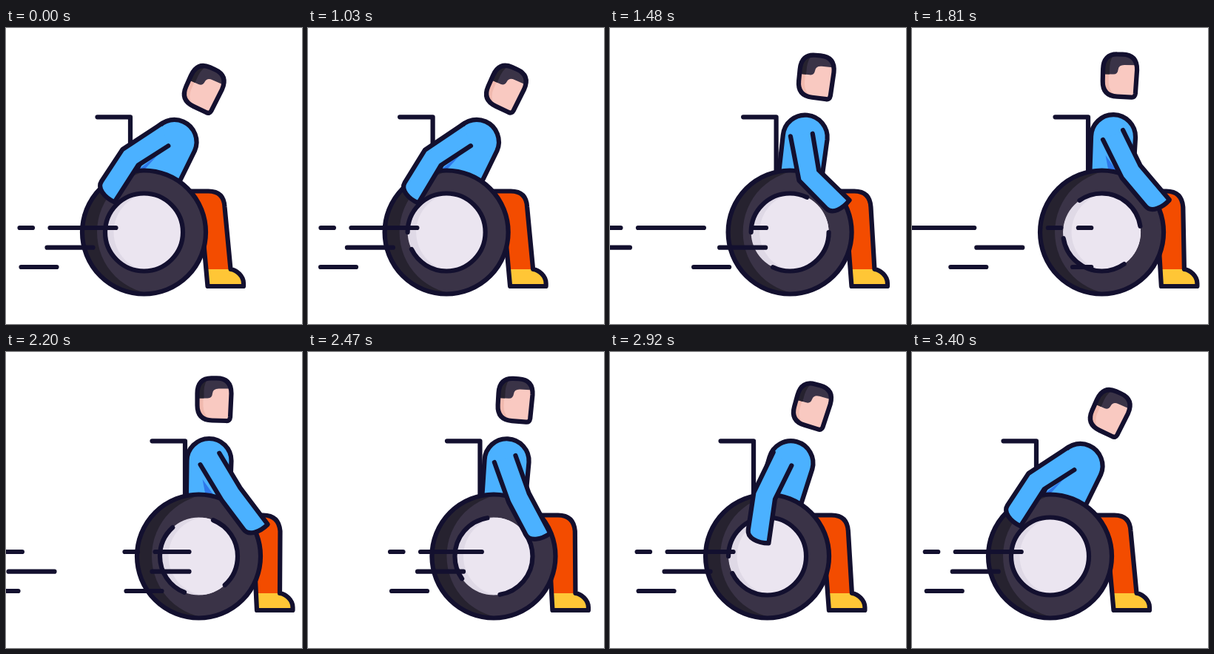
These frames come from a looping animation (400x400 px, 3.43 s). An HTML page:

```html
<!DOCTYPE html>
<html lang="en">
<head>
<meta charset="utf-8">
<title>Wheelchair</title>
<style>
  html, body { margin: 0; width: 100%; height: 100%; overflow: hidden; background: #fff; }
  svg { display: block; width: 100vw; height: 100vh; }
  .line { fill: none; stroke: #13102f; stroke-width: 6.2; stroke-linecap: round; stroke-linejoin: round; }
  .blue { fill: #4bb1ff; }
  .shade { fill: #2f78ea; }
  .dark { fill: #3a3347; }
  .darker { fill: #26222f; }
</style>
</head>
<body>
<svg viewBox="0 0 400 400">
  <defs>
    <path id="headShape" d="M185 72V56Q185 35.300 204 35.300H211Q231 35.300 231 56L229.500 88Q229 93.500 224 93L205 92.500Q185 92 185 72Z"/>
    <clipPath id="headClip"><use href="#headShape"/></clipPath>
    <clipPath id="tireClip"><circle cx="187" cy="276" r="83.500"/></clipPath>
    <clipPath id="discClip"><circle cx="187" cy="276" r="52.500"/></clipPath>
  </defs>
  <g id="chair">
    <path class="line" d="M124 120.300H168.500V200"/>
    <path id="trousers" fill="#f34c00"/>
    <path id="shoe" fill="#ffc636"/>
    <path id="legLine" class="line"/>
    <g id="body">
      <path class="line" style="fill:#4bb1ff" d="M170 225L171 147A30 30 0 0 1 231 147L228 225Z"/>
      <g clip-path="url(#headClip)">
        <rect x="180" y="30" width="56" height="66" fill="#f9c9c1"/>
        <path fill="#f1b9ae" d="M180 60H193V74Q194 87 206 94H180Z"/>
        <path class="dark" d="M180 30H236V49.500H214Q206 49.500 205.500 56Q205 62.500 199 62.500H180Z"/>
        <path class="darker" d="M180 30H206Q195 36 194 52V62.500H180Z"/>
      </g>
      <use href="#headShape" class="line"/>
    </g>
    <path id="shadowBack" class="shade" d="M180 191L206 171L187 192Z"/>
    <path id="shadowFront" class="shade" d="M192 172L207 193H196Z"/>
    <g clip-path="url(#tireClip)">
      <circle class="darker" cx="187" cy="276" r="84"/>
      <circle class="dark" cx="207.500" cy="276" r="84"/>
    </g>
    <circle class="line" cx="187" cy="276" r="83.500"/>
    <g clip-path="url(#discClip)">
      <circle cx="187" cy="276" r="53" fill="#dfd9e6"/>
      <circle cx="199" cy="276" r="53" fill="#ebe5f0"/>
    </g>
    <path id="rim" class="line" pathLength="360" d="M134.500 276A52.500 52.500 0 0 1 239.500 276A52.500 52.500 0 0 1 134.500 276"/>
    <path id="armFill" class="blue"/>
    <path id="armLine" class="line"/>
    <path id="speed" class="line"/>
  </g>
</svg>
<script>
const LOOP = 3430, START = 1030, STEP = 30;
const TURN = 2200, TRIP = 1200, TRAVEL = 74, LEAN = 24;
const $ = id => document.getElementById(id);
const set = (id, name, value) => $(id).setAttribute(name, value);
const clamp = (x, max = 1) => Math.max(0, Math.min(max, x));
const smooth = u => u * u * (3 - 2 * u);

// Same as cubic-bezier(.167, 0, .1, 1)
function push(x) {
  let lo = 0, hi = 1;
  for (let i = 0; i < 24; i++) {
    const s = (lo + hi) / 2, r = 1 - s;
    if (.5 * s * r * r + .3 * s * s * r + s * s * s < x) lo = s; else hi = s;
  }
  return smooth(lo);
}

// Point reached from o by going along the angle (0 = down), then across to the rear
function reach(o, deg, along, across = 0) {
  const a = deg * Math.PI / 180, s = Math.sin(a), c = Math.cos(a);
  return [o[0] + s * along - c * across, o[1] + c * along + s * across];
}

// Two jointed sections of even width; the forearm swings out while pushing
function drawArm(p, forward) {
  const upper = -57 + 88 * p;
  const fore = -33 + 70 * p + (forward ? 136 * p * (1 - p) : 0);
  const half = 15, skew = 4 * (1 - p);
  const shoulder = [202 + 13 * (1 - p) ** 2, 144.5];
  const elbow = reach(shoulder, upper, 55.5);
  const wrist = reach(elbow, fore, 55.5);
  const bend = (upper + fore) / 2;
  const d = 'M' + reach(shoulder, upper, -skew, half) +
    'L' + reach(elbow, bend, 0, half) +
    'L' + reach(wrist, fore, -7, half) +
    'C' + reach(wrist, fore, 4, half) + ' ' + reach(wrist, fore, 9, 0) + ' ' + reach(wrist, fore, 7, -half) +
    'L' + reach(elbow, bend, 0, -half) +
    'L' + reach(shoulder, upper, skew, -half);
  set('armFill', 'd', d + 'Z');
  set('armLine', 'd', d);
}

// The foot lags behind as the knee opens
function drawLeg(q) {
  const f = -7.5 * q;
  const foot = `C${312 + f} 327 ${321.5 + f} 335 ${321.5 + f} 345V349H${273 + f}`;
  const leg = `M250 220.500H274Q295 220.500 ${296 + q} 242L${304 + f} 326`;
  const heel = `L${264 + f * .45} 250`;
  set('trousers', 'd', `${leg}H${271 + f}${heel}Z`);
  set('shoe', 'd', `M${271 + f} 326H${304 + f}${foot}Z`);
  set('legLine', 'd', leg + foot + heel);
}

// Resting dashes are [left, length]; "out" and "lead" are speeds in px per ms
const rows = [
  { y: 270, dashes: [[19, 17.5], [60, 89]], out: .17, lead: .07 },
  { y: 296.7, dashes: [[56, 62]], out: .32, lead: .15, extra: true },
  { y: 323, dashes: [[21, 48]], out: .41, lead: .15, extra: true }
];

// One wave leaves, an extra one may pass, the last one settles
function drawStreaks(t, p) {
  const edge = 150 + 24 * p;
  const late = t - TURN;
  const settle = late < 0 ? 0 : Math.max(0, 68 - .145 * late) - 8 * Math.sin(Math.PI * clamp((t - 2440) / 990));
  let d = '';
  for (const { y, dashes, out, lead, extra } of rows) {
    const shifts = [-out * Math.max(0, t - 1020), late < 0 ? 68 - lead * late : settle];
    if (extra) shifts.push(36 - .225 * (t - 1480));
    for (const [left, len] of dashes) for (const shift of shifts) {
      const x = left + shift, end = Math.min(x + len, edge);
      if (end > x) d += `M${x} ${y}H${end}`;
    }
  }
  set('speed', 'd', d);
}

// The rim opens into two arcs, turns half a round and closes
function drawRim(t) {
  const gap = 64;
  const open = clamp((t - 1030) / 450), close = clamp((t - 2680) / 240, 1.2);
  const dash = 116 + 218 * (1 - open + close);
  const spin = 1 - (1 - clamp((t - 1480) / 1440)) ** 1.4;
  set('rim', 'stroke-dasharray', t >= START && dash < 360 ? `${dash} ${gap}` : 'none');
  set('rim', 'stroke-dashoffset', -spin * (dash + gap));
}

function draw(time) {
  const t = time < START ? 0 : START + STEP * Math.floor((time - START) / STEP);
  const forward = t < TURN;
  const out = clamp((t - TURN + TRIP) / TRIP);
  const back = 1 - smooth(clamp((t - TURN) / TRIP));
  const p = forward ? push(out) : back;
  set('chair', 'transform', `translate(${TRAVEL * p - .5})`);
  set('body', 'transform', `rotate(${LEAN * (1 - p)} 198 214)`);
  set('shadowBack', 'opacity', p < .2 ? 1 : 0);
  set('shadowFront', 'opacity', p > .92 ? 1 : 0);
  drawArm(p, forward);
  drawLeg(forward ? smooth(out) : back);
  drawRim(t);
  drawStreaks(t, p);
}

const origin = performance.now();
function tick() {
  draw((performance.now() - origin) % LOOP);
  requestAnimationFrame(tick);
}
tick();
</script>
</body>
</html>
```
